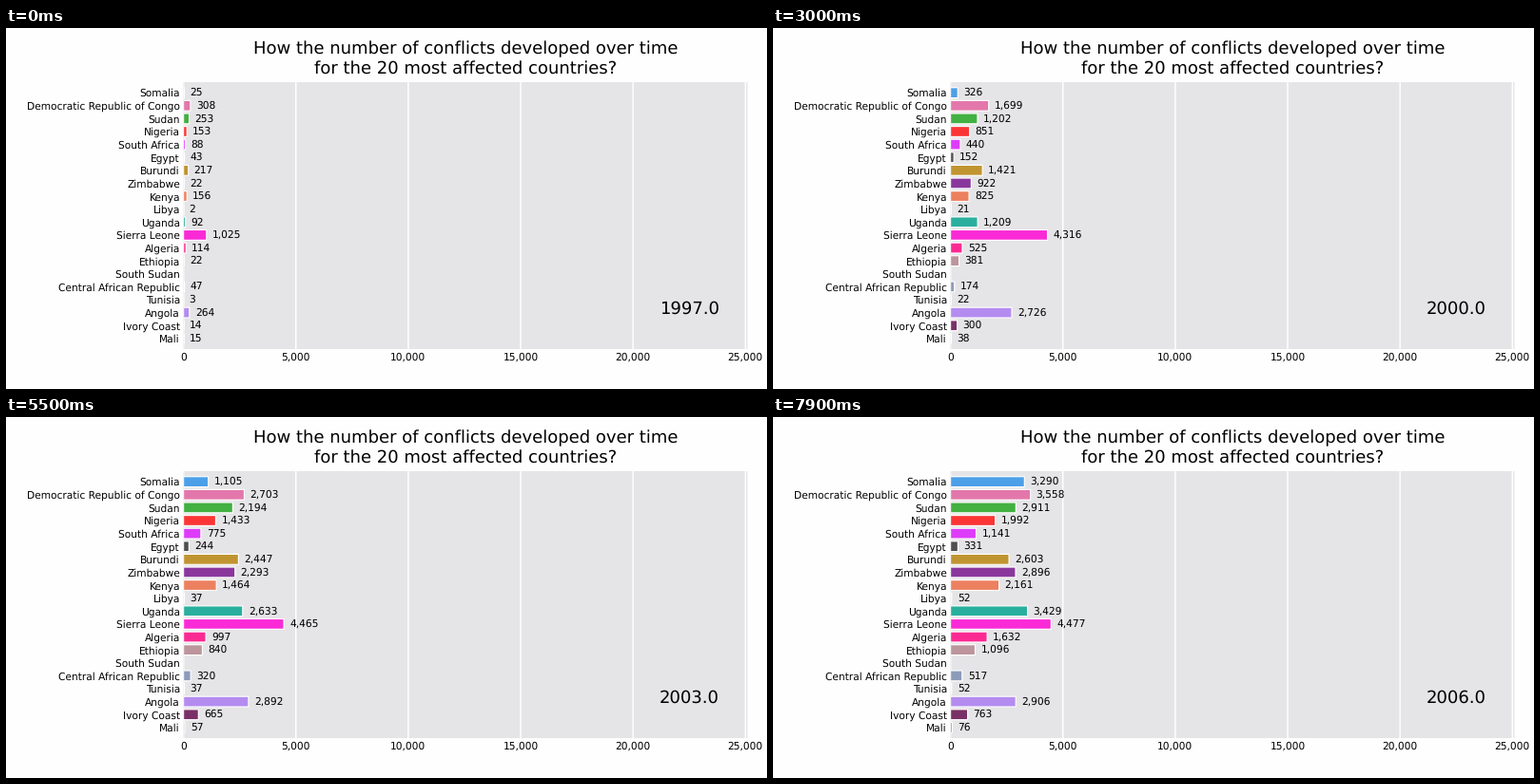
A matplotlib script that plays this animation: 800x380 px, repeating every 8 s.

```python
import numpy as np
import matplotlib.pyplot as plt
from matplotlib.animation import FuncAnimation

W, H, DPI = 800, 380, 100
FRAMES, INTERVAL = 80, 100
STEPS_PER_YEAR, FIRST_YEAR = 8, 1997
PX = 72 / DPI  # points per pixel
SMALL, LARGE = 10.6 * PX, 18 * PX

# name, colour, first total, last total, then optional lean and pace
COUNTRIES = [
    ("Somalia", "#4d9fe8", 25, 3290, -1.7, 1.2),
    ("Democratic Republic of Congo", "#e377ab", 308, 3558, 0.2),
    ("Sudan", "#42b042", 253, 2911, 0, 1.2),
    ("Nigeria", "#fb3535", 153, 1992),
    ("South Africa", "#dd3cfa", 88, 1141, -0.2),
    ("Egypt", "#4f4f4f", 43, 331),
    ("Burundi", "#c09430", 217, 2603, 1, 2),
    ("Zimbabwe", "#8a379c", 22, 2896, 0, 1.6),
    ("Kenya", "#ec8160", 156, 2161, -0.2),
    ("Libya", "gray", 2, 52),
    ("Uganda", "#2aaf9e", 92, 3429, 0, 1.4),
    ("Sierra Leone", "#fa2bd7", 1025, 4477, 4, 2),
    ("Algeria", "#fb2a93", 114, 1632, -0.5),
    ("Ethiopia", "#bd959d", 22, 1096, 0, 1.4),
    ("South Sudan", "gray", 0, 0),
    ("Central African Republic", "#8d9bbb", 47, 517, -0.5),
    ("Tunisia", "gray", 3, 52),
    ("Angola", "#b48cf0", 264, 2906, 3.6, 2),
    ("Ivory Coast", "#793067", 14, 763, 0.4, 1.8),
    ("Mali", "gray", 15, 76),
]
names = [c[0] for c in COUNTRIES]
colors = [c[1] for c in COUNTRIES]


def growth(u, first, last, lean=0, pace=1):
    """S-curve from first to last; lean > 0 rises early, pace > 1 is steeper."""
    up, down = np.exp(lean) * u ** pace, (1 - u) ** pace
    return first + (last - first) * up / (up + down)


progress = np.linspace(0, 1, FRAMES)
totals = np.array([growth(progress, *c[2:]) for c in COUNTRIES])

plt.rcParams.update({"font.family": "DejaVu Sans", "text.hinting": "none"})
fig = plt.figure(figsize=(W / DPI, H / DPI), dpi=DPI, facecolor="#fefefe")

left, right, top, bottom = 186.6, 779.4, 57, 338
ax = fig.add_axes([left / W, 1 - bottom / H, (right - left) / W, (bottom - top) / H],
                  facecolor="#e5e4e6")
ax.patch.set_snap(False)
for spine in ax.spines.values():
    spine.set_visible(False)

x_max = 25000 * (right - left) / 590.7
ax.set_xlim(0, x_max)
ax.set_ylim(19.82, -0.82)
ax.set_axisbelow(True)
ax.grid(axis="x", color="white", lw=1.5 * PX)
plt.setp(ax.get_xgridlines(), snap=False)
ax.tick_params(length=0, pad=3.6 * PX, labelsize=SMALL)
ax.xaxis.set_major_formatter("{x:,.0f}")
ax.set_title("How the number of conflicts developed over time\n"
             "for the 20 most affected countries?",
             fontsize=LARGE, pad=9 * PX, linespacing=1.25)

rows = range(len(COUNTRIES))
ax.set_yticks(rows, names)
bars = ax.barh(rows, totals[:, 0], height=0.8, color=colors,
               ec="white", lw=1.2 * PX, snap=False)
labels = [ax.text(0, r, "", va="center", fontsize=SMALL) for r in rows]
year = ax.text(0.95, 0.15, "", transform=ax.transAxes, ha="right", va="center",
               fontsize=LARGE)


def draw(step):
    for bar, label, value in zip(bars, labels, totals[:, step]):
        bar.set_width(value)
        label.set_x(value + 0.01 * x_max)
        label.set_text(f"{value:,.0f}" if value else "")
    year.set_text(f"{FIRST_YEAR + step // STEPS_PER_YEAR:.1f}")
    return [*bars, *labels, year]


anim = FuncAnimation(fig, draw, frames=FRAMES, interval=INTERVAL, repeat=True,
                     repeat_delay=0)
plt.show()
```
